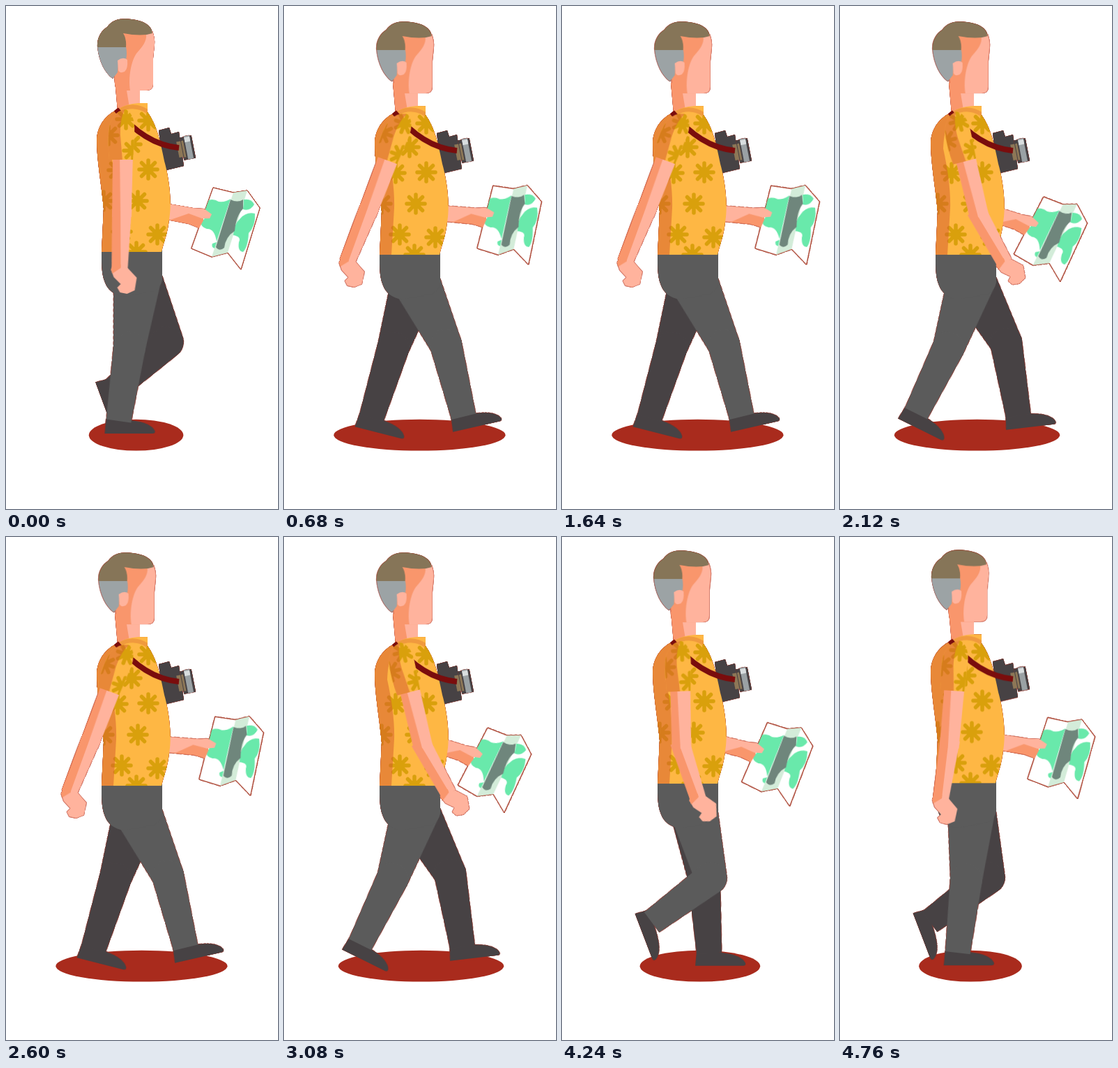
These frames come from a looping animation (390 px wide and 720 px high, 4800 ms). An HTML page without scripts:

```html
<!DOCTYPE html>
<html lang="en">
<head>
<meta charset="utf-8">
<title>Walking tourist</title>
<style>
  html, body { margin: 0; width: 100%; height: 100%; overflow: hidden; background: #fff; }
  svg { display: block; width: 390px; height: 720px; }

  .skin { fill: #ffb39d; }
  .tan { fill: #f9966c; }
  .cloth { fill: #feb744; }
  .shade { fill: #d35a2c; opacity: .5; }
  .dark { fill: #474244; }
  .pants { fill: #5b5b5b; }
  .green { fill: #69e9ab; }
  .flowers { stroke: #d9a00c; stroke-width: 5.5; stroke-linecap: round; }
  .figure { filter: drop-shadow(0 0 .5px #a42a1c) drop-shadow(0 0 .4px #a42a1c); }

  /* One full stride takes 960 ms, each step half of that. */
  .thigh, .shin, .shoe, .arm, .forearm, .hand, .reach, .shadow {
    animation: 960ms linear infinite;
    animation-delay: var(--lag, 0ms);
  }
  .far { --lag: -440ms; }
  .thigh { animation-name: thigh; }
  .shin { animation-name: shin; }
  .shoe { animation-name: shoe; }
  .shadow { animation-name: shadow; }
  .arm { animation-name: arm; transform-origin: 166px 165px; }
  .forearm { animation-name: forearm; transform-origin: 167px 300px; }
  .hand { animation-name: hand; transform-origin: 163px 373px; }
  .reach { animation-name: reach; transform-origin: 227px 227px; }
  .bob, .nod { animation: bob 240ms cubic-bezier(.37, 0, .63, 1) infinite alternate; }
  .nod { animation-name: nod; }

  @keyframes bob { to { transform: translateY(4.3px); } }
  @keyframes nod { to { transform: translateX(1.8px); } }

  @keyframes thigh {
    0%, 100% { transform: rotate(7.3deg); }
    16.67% { transform: rotate(19deg); }
    25% { transform: rotate(20deg); }
    29.17% { transform: rotate(14deg); }
    41.67% { transform: rotate(-13.2deg); }
    45.83% { transform: rotate(-24deg); }
    54.17% { transform: rotate(-36deg); }
    62.5% { transform: rotate(-32deg); }
    70.83% { transform: rotate(-24.5deg); }
    87.5% { transform: rotate(-8deg); }
    95.83% { transform: rotate(5deg); }
  }
  @keyframes shin {
    0%, 100% { transform: rotate(1deg); }
    16.67% { transform: rotate(-2deg); }
    25% { transform: rotate(15deg); }
    29.17% { transform: rotate(38deg); }
    41.67% { transform: rotate(66.7deg); }
    45.83% { transform: rotate(73deg); }
    54.17% { transform: rotate(61deg); }
    62.5% { transform: rotate(27deg); }
    70.83% { transform: rotate(10.5deg); }
    87.5% { transform: rotate(4deg); }
    95.83% { transform: rotate(1.6deg); }
  }
  @keyframes shoe {
    0%, 100% { transform: rotate(-8.3deg); }
    16.67% { transform: rotate(-3deg); }
    25% { transform: rotate(3deg); }
    29.17% { transform: rotate(6deg); }
    41.67% { transform: rotate(15.5deg); }
    45.83% { transform: rotate(21deg); }
    54.17% { transform: rotate(20deg); }
    62.5% { transform: rotate(5deg); }
    70.83% { transform: rotate(1deg); }
    87.5% { transform: rotate(4deg); }
    95.83% { transform: rotate(-6.6deg); }
  }
  @keyframes arm {
    0%, 100% { transform: rotate(0deg); }
    12.5% { transform: rotate(-11deg); }
    25% { transform: rotate(-16deg); }
    41.67% { transform: rotate(-2.5deg); }
    70.83% { transform: rotate(20deg); }
    75% { transform: rotate(20.5deg); }
    95.83% { transform: rotate(4deg); }
  }
  @keyframes forearm {
    0%, 100% { transform: rotate(0deg); }
    25% { transform: rotate(-20deg); }
    41.67% { transform: rotate(-18deg); }
    70.83% { transform: rotate(0deg); }
    95.83% { transform: rotate(3deg); }
  }
  @keyframes hand {
    0%, 100% { transform: rotate(0deg); }
    25% { transform: rotate(14deg); }
    41.67% { transform: rotate(9deg); }
    70.83%, 75% { transform: rotate(-18deg); }
    95.83% { transform: rotate(-4deg); }
  }
  @keyframes reach {
    0%, 50%, 100% { transform: rotate(0deg); animation-timing-function: cubic-bezier(.61, 1, .88, 1); }
    25% { transform: rotate(8deg); animation-timing-function: cubic-bezier(.12, 0, .39, 0); }
    75% { transform: rotate(-5.5deg); animation-timing-function: cubic-bezier(.12, 0, .39, 0); }
  }
  @keyframes shadow {
    0%, 100% { cx: 186.5px; rx: 67.5px; }
    16.67% { cx: 195px; rx: 112px; }
    25% { cx: 198px; rx: 125px; }
    41.67% { cx: 198px; rx: 86.500px; }
    50% { cx: 190px; rx: 68px; }
    70.83% { cx: 194.5px; rx: 123px; }
    75% { cx: 192px; rx: 126px; }
    95.83% { cx: 187px; rx: 74px; }
  }
</style>
</head>
<body>
<svg viewBox="0 0 390 720">
  <defs>
    <path id="thigh" d="M-36 0H33L23 102A23 22 0 0 1 -23 102Z"/>
    <path id="shin" d="M-23 0A23 22 0 0 1 23 0L18 106H-18Z"/>
    <path id="shoe" d="M-18 -3L18 -1Q46 2 52 14Q53 18 48 18H-20Z"/>
    <path id="flower" d="M-13 0H13M0 -13V13M-9.5 -9.5L9.5 9.5M-9.5 9.5L9.5 -9.5"/>
    <path id="shirt" d="M160 148Q172 140 190 139H203V152C216 170 221 192 227 222C235 250 238 285 234 305C232 325 227 335 223 352H137L140 290C136 250 130 220 130 190C132 168 145 155 160 148Z"/>
    <path id="sleeve" d="M149 168Q157 149 172 148Q186 156 184 182L182 220H148Q145 190 149 168Z"/>
    <path id="map" d="M297 260L326 267L346 264L364 289L337 377L318 353L295 359L266 347Z"/>
    <clipPath id="in-shirt"><use href="#shirt"/></clipPath>
    <clipPath id="in-sleeve"><use href="#sleeve"/></clipPath>
    <clipPath id="in-map"><use href="#map"/></clipPath>
  </defs>

  <ellipse class="shadow" cx="186.5" cy="614.2" rx="67.5" ry="22.4" fill="#a92b1d"/>

  <g class="figure"><g class="bob">
    <g class="far dark" transform="translate(190 388)">
      <g class="thigh">
        <use href="#thigh"/>
        <g transform="translate(0 102)"><g class="shin">
          <g transform="translate(0 106)"><g class="shoe"><use href="#shoe"/></g></g>
          <use href="#shin"/>
        </g></g>
      </g>
    </g>

    <g class="reach">
      <use href="#map" fill="#fff" stroke="#a8452f"/>
      <path fill="#d3ecd9" d="M326 267L346 264L318 353L295 359Z"/>
      <g class="green" clip-path="url(#in-map)">
        <path d="M285 280Q296 274 305 280Q315 281 322 276L302 337Q299 318 288 319Q279 316 280 310Q290 300 285 290Z"/>
        <path d="M341 277Q352 275 356 284Q350 294 340 291Z"/>
        <path d="M336 304Q345 294 357 297Q358 315 348 325Q347 345 340 352Q332 351 334 338Q338 330 326 328Q327 312 336 304Z"/>
        <path d="M302 338L299 347Q294 345 296 340Z"/>
      </g>
      <path fill="#6f867c" d="M322 277Q332 282 340 277V290Q330 300 328 322Q315 330 313 346Q306 352 301 345Z"/>
      <path class="tan" d="M215 280L268 289L283 300L283 307L277 318L262 312L215 303Z"/>
      <path class="skin" d="M215 280L268 289L284 290L295 298L292 304L281 304L262 297L236 306L215 303Z"/>
    </g>

    <path class="dark" d="M219 178L234 174L237 183L248 180L255 229L226 236Z"/>
    <g transform="rotate(-11 258 203)">
      <rect x="246" y="192" width="7" height="23" fill="#8d7757"/>
      <rect x="252" y="187" width="17" height="33" class="dark"/>
      <rect x="253" y="192" width="3" height="24" fill="#8d7757"/>
      <rect x="258" y="186" width="8" height="34" fill="#9aa1a4"/>
      <rect x="258" y="188" width="8" height="7" fill="#d9dedf"/>
    </g>

    <g class="pants">
      <g transform="translate(190 388)">
        <g class="thigh">
          <use href="#thigh"/>
          <g transform="translate(0 102)"><g class="shin">
            <g transform="translate(0 106)"><g class="shoe dark"><use href="#shoe"/></g></g>
            <use href="#shin"/>
          </g></g>
        </g>
      </g>
      <path d="M137 350H224V392Q222 403 212 408L168 416Q148 412 142 396Q137 385 137 365Z"/>
    </g>

    <path class="tan" d="M156 106L160 150H192V110Z"/>
    <path class="skin" d="M173 121H192V145H177Z"/>

    <use href="#shirt" class="cloth"/>
    <g clip-path="url(#in-shirt)">
      <g class="flowers">
        <use href="#flower" x="204" y="234"/>
        <use href="#flower" x="189" y="279"/>
        <use href="#flower" x="217" y="327"/>
        <use href="#flower" x="166" y="323"/>
        <use href="#flower" x="187" y="352"/>
        <use href="#flower" x="140" y="279"/>
        <use href="#flower" x="160" y="235"/>
        <use href="#flower" x="204" y="164"/>
        <use href="#flower" x="180" y="198"/>
      </g>
      <path class="shade" d="M162 146Q149 168 148 200Q159 250 158 285Q156 320 154 352H120V146Z"/>
      <path d="M162 150Q182 138 203 151" fill="none" stroke="#f09a3e" stroke-width="6"/>
    </g>
    <path d="M158 148Q198 198 248 203" fill="none" stroke="#7a0d0d" stroke-width="8"/>

    <g class="nod">
      <path class="tan" d="M156 111Q152 80 168 39L202 38V121H158Z"/>
      <path class="skin" d="M201 41L210 36Q214 46 213 56L211 75V112Q211 121 201 121H178C175 100 180 78 187 68C196 58 202 50 201 41Z"/>
      <path fill="#9ca3a5" d="M131 58H172Q174 68 172 77L161 82L160 95L153 104C142 96 133 80 131 58Z"/>
      <path fill="#867558" d="M131 59C130 45 137 35 145 30C153 18 168 17 180 19C198 21 209 28 210 39Q195 44 168 39Q173 47 172 59Z"/>
      <path class="skin" d="M160 78Q168 72 174 77Q175 90 170 94Q163 97 161 92Z"/>
    </g>

    <g class="arm">
      <g class="forearm">
        <path class="tan" d="M152 291H166V376H151Z"/>
        <path class="skin" d="M164 291H180L174 377H164Z"/>
        <g class="hand">
          <path class="skin" d="M150 377L164 374L174 375L187 389L184 407L173 412L163 410L159 403L164 398L154 388Z"/>
          <path class="tan" d="M150 377L153 370H164V375L152 383Z"/>
        </g>
      </g>
      <path class="tan" d="M153 212H165V302H152Z"/>
      <path class="skin" d="M163 212H182L179.500 302H164Z"/>
      <use href="#sleeve" class="cloth"/>
      <g clip-path="url(#in-sleeve)">
        <g class="flowers">
          <use href="#flower" x="172" y="162"/>
          <use href="#flower" x="147" y="185"/>
          <use href="#flower" x="182" y="207"/>
        </g>
        <path class="shade" d="M140 145H172Q163 160 164 185L167 222H140Z"/>
      </g>
    </g>
  </g></g>
</svg>
</body>
</html>
```
